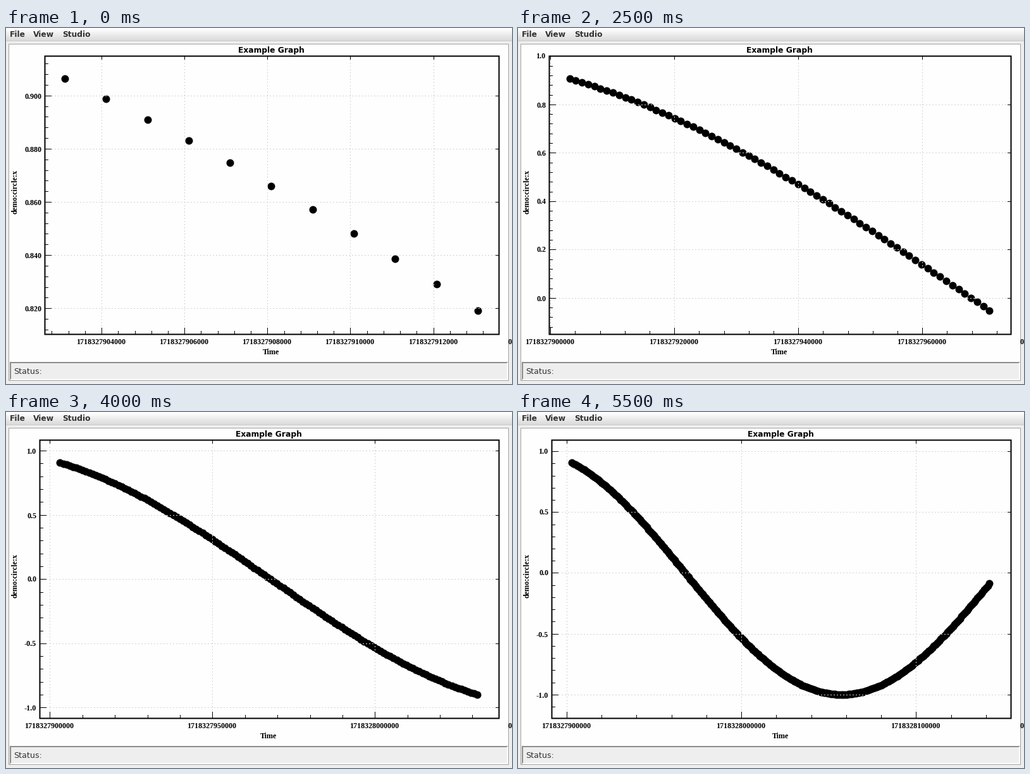
Write a matplotlib script that moves like this. It is 800 px wide and 563 px high and loops after 6000 ms.

```python
import math

import matplotlib.pyplot as plt
import numpy as np
from matplotlib.animation import FuncAnimation
from matplotlib.patches import Rectangle

W, H, DPI = 800, 563, 100
PX = 72 / DPI
TOP, BOTTOM, RIGHT = 44, 484, 779
EPOCH = 1718327900
START, PERIOD = 3.115, 0.9957  # seconds after EPOCH, seconds per sample

# Index of the newest sample in each picture
NEWEST = [10, 26, 39, 53, 82, 68, 98, 113, 129, 146, 212, 240]

fig = plt.figure(figsize=(W / DPI, H / DPI), dpi=DPI, facecolor="#eeeeee")
ax = fig.add_axes([0, 0, 1, 1])
drawn = []


def box(x, y, w, h, face):
    ax.add_patch(Rectangle((x, y), w, h, facecolor=face, lw=0,
                           antialiased=False, zorder=0))


def text(x, y, s, font="Liberation Serif", size=12, weight="bold", **kw):
    kw = {"ha": "center", "va": "baseline", "color": "black",
          "zorder": 6, **kw}
    return ax.text(x, y, s, family=font, fontsize=size * PX,
                   fontweight=weight, **kw)


def lines(segments, color="black", **kw):
    """Draw separate one-pixel segments (x0, y0, x1, y1) as one artist."""
    xs, ys = [], []
    for x0, y0, x1, y1 in segments:
        xs += [x0, x1, math.nan]
        ys += [y0, y1, math.nan]
    return ax.plot(xs, ys, color=color, lw=PX, antialiased=False, snap=False,
                   solid_capstyle="butt", **kw)[0]


def draw_window():
    shade = np.linspace(1, 0.855, 20)[:, None]
    ax.imshow(shade, cmap="gray", vmin=0, vmax=1, extent=(0, W, 20, 0),
              aspect="auto", zorder=0)
    ax.set(xlim=(0, W), ylim=(H, 0))
    ax.axis("off")
    box(0, 20, W, 1, "#cccccc")
    box(4, 25, 791, 533, "#a3a3a3")
    box(5, 26, 789, 531, "#eeeeee")
    box(5, 26, 789, 502, "#fefefe")
    # Lowered bevel around the status line
    box(6, 528, 788, 29, "#a6a6a6")
    box(7, 529, 787, 28, "#ffffff")
    box(7, 529, 785, 26, "#747474")
    box(8, 530, 784, 25, "#eeeeee")
    for x, name in ((6, "File"), (43, "View"), (89.5, "Studio")):
        text(x, 14, name, "DejaVu Sans", 12.3, ha="left", color="#333333")
    text(12.5, 547, "Status:", "DejaVu Sans", 12.6, "normal", ha="left",
         color="#333333")
    text(17, 259.5, "demo:circle:x", rotation=90, rotation_mode="anchor")
    text(794, 500, "0", ha="left")


def round_up(value):
    unit = 10 ** math.floor(math.log10(value))
    return next(m for m in (1, 2, 5, 10) if value <= m * unit) * unit


def ticks(low, high, step):
    value, found = step * math.ceil(low / step), []
    while value <= high:
        found.append(value)
        value += step
    return found


def label_width(s):
    return sum({".": 3, "-": 4}.get(c, 6) for c in s)


def update(frame):
    while drawn:
        drawn.pop().remove()

    k = np.arange(NEWEST[frame] + 1)
    t = START + PERIOD * k
    v = np.cos(np.radians(25 + k))

    # Vertical axis: 10 % padding on both sides
    pad = 0.1 * np.ptp(v)
    v_low, v_high = v.min() - pad, v.max() + pad
    v_span = v_high - v_low
    v_step = round_up(v_span / 10)
    digits = 3 if v_span < 0.2 else 2 if v_span < 1 else 1
    v_major = ticks(v_low, v_high, v_step)
    v_labels = [f"{value:.{digits}f}" for value in v_major]
    left = 34 + max(map(label_width, v_labels))

    # Horizontal axis: 5 % padding on both sides
    pad = 0.05 * np.ptp(t)
    t_low, t_high = t[0] - pad, t[-1] + pad
    t_span = t_high - t_low
    t_step = round_up(t_span / (6 if t_span < 100 else 5))
    t_major = ticks(t_low, t_high, t_step)

    def px(value):
        return left + (value - t_low) / t_span * (RIGHT - left)

    def py(value):
        return BOTTOM - (value - v_low) / v_span * (BOTTOM - TOP)

    def pixel_centres(scale, values):
        return [math.floor(scale(value)) + 0.5 for value in values]

    xs = pixel_centres(px, t_major)
    ys = pixel_centres(py, v_major)
    minor_x = pixel_centres(px, ticks(t_low, t_high, t_step / 5))
    minor_y = pixel_centres(py, ticks(v_low, v_high, v_step / 5))

    x0, x1, y0, y1 = left, RIGHT + 1, TOP, BOTTOM + 1
    marks = [(x0, y, x0 + 11, y) for y in ys]
    marks += [(x1, y, x1 - 6, y) for y in ys]
    marks += [(x, y1, x, y1 - 11) for x in xs]
    marks += [(x, y0, x, y0 + 6) for x in xs]
    marks += [(x0, y, x0 + 6, y) for y in minor_y]
    marks += [(x, y1, x, y1 - 6) for x in minor_x]
    grid = [(x0 + 11, y, x1 - 6, y) for y in ys]
    grid += [(x, y0 + 6, x, y1 - 11) for x in xs]

    # Markers snap to the nearest pixel corner; the shift makes that a floor
    drawn.append(ax.plot(px(t) - 0.51, py(v) - 0.51, "o", color="black",
                         ms=12 * PX, mew=0, zorder=2)[0])
    drawn.append(lines(grid, "#d3d3d3", linestyle=(0, (2, 4)), zorder=3))
    drawn.append(lines(marks, zorder=4))
    drawn.append(ax.add_patch(Rectangle(
        (left + 0.5, TOP + 0.5), RIGHT - left, BOTTOM - TOP, fill=False,
        ec="black", lw=2 * PX, joinstyle="miter", snap=False, zorder=5)))

    for y, label in zip(ys, v_labels):
        drawn.append(text(left - 5, y + 4, label, ha="right"))
    panel = Rectangle((5, 26), 789, 502, transform=ax.transData)
    for x, value in zip(xs, t_major):
        label = text(x - 0.5, 500, f"{EPOCH + round(value)}000")
        label.set_clip_path(panel)
        label.set_clip_on(True)
        drawn.append(label)

    middle = (left + RIGHT) / 2 - 0.5
    drawn.append(text(middle, 39, "Example Graph", "DejaVu Sans", 12.3))
    drawn.append(text(middle, 516, "Time"))
    return drawn


draw_window()
animation = FuncAnimation(fig, update, frames=len(NEWEST), interval=500,
                          init_func=lambda: drawn, repeat=True,
                          repeat_delay=0, blit=False)
plt.show()
```
